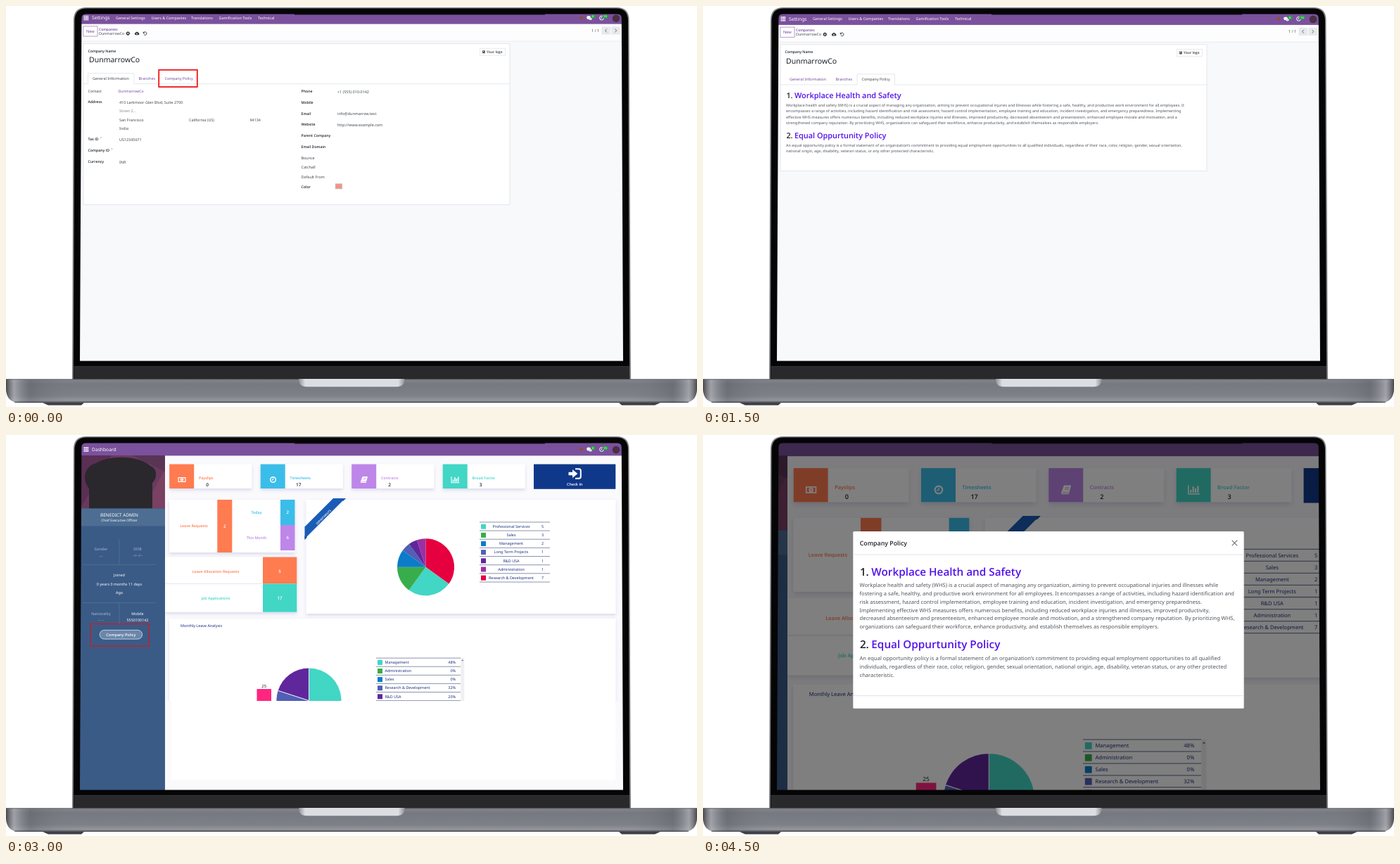
Animation, 982 px wide and 570 px high, one loop 6 s. Source, as an HTML page:

```html
<!DOCTYPE html>
<html lang="en">
<head>
<meta charset="utf-8">
<title>Company policy</title>
<style>
html, body { margin: 0; width: 100%; height: 100%; overflow: hidden; background: #fff; }
svg { display: block; width: 982px; height: 570px; }
text { font-family: "Noto Sans", "Open Sans", sans-serif; text-rendering: geometricPrecision; white-space: pre; }
text.b { font-family: "Open Sans", "Noto Sans", sans-serif; font-weight: 600; }
.scene { opacity: 0; }
.scene:first-child { opacity: 1; }
</style>
</head>
<body>
<svg id="stage" viewBox="0 0 982 570" xmlns="http://www.w3.org/2000/svg"></svg>
<script>
const LOOP = 6000;
const INK = '#41474e', DARK = '#1f242b', PURPLE = '#74489a', NAVY = '#1c2f7c', LINE = '#dee2e6';
const ORANGE = '#ff7b50', SKY = '#3bbde9', LILAC = '#be86e9', TEAL = '#42d6c5';
const GREEN = '#38ad4b', BLUE = '#0a7cca', INDIGO = '#5060b5', VIOLET = '#60279c', MAGENTA = '#9c2fa0', RED = '#e6003f';
const COMPANY = 'DunmarrowCo';

// Drawing helpers; text is placed by the middle of its capitals.
const esc = s => String(s).replace(/&/g, '&amp;');
const text = (x, y, s, { size = 5.42, fill = INK, bold = 0, anchor = 'start', more = '' } = {}) =>
  `<text x="${x}" y="${(y + size * 0.36).toFixed(2)}" font-size="${size}" fill="${fill}" text-anchor="${anchor}"${bold ? ' class="b"' : ''} ${more}>${esc(s)}</text>`;
const mid = (x, y, s, o = {}) => text(x, y, s, { ...o, anchor: 'middle' });
const rect = (x, y, w, h, fill, more = '') => `<rect x="${x}" y="${y}" width="${w}" height="${h}" fill="${fill}" ${more}/>`;
const path = (d, fill, more = '') => `<path d="${d}" fill="${fill}" ${more}/>`;
const stroke = (d, color, w = 1) => path(d, 'none', `stroke="${color}" stroke-width="${w}"`);
const circle = (x, y, r, fill, more = '') => `<circle cx="${x}" cy="${y}" r="${r}" fill="${fill}" ${more}/>`;
const group = (inner, attrs) => `<g ${attrs}>${inner}</g>`;

function pie(cx, cy, r, slices, edge) {
  const total = slices.reduce((sum, s) => sum + s[0], 0);
  let turn = 0;
  const at = () => {
    const a = turn / total * 2 * Math.PI;
    return `${(cx + r * Math.sin(a)).toFixed(2)} ${(cy - r * Math.cos(a)).toFixed(2)}`;
  };
  return slices.map(([n, color]) => {
    const from = at();
    turn += n;
    return path(`M${cx} ${cy}L${from}A${r} ${r} 0 ${n * 2 > total ? 1 : 0} 1 ${at()}Z`, color, edge);
  }).join('');
}

function topBar(y, bottom, title, menu) {
  let out = rect(100, 5, 785, bottom - 5, '#7b519d');
  for (let i = 0; i < 9; i++)
    out += rect(110.6 + (i % 3) * 2.4, y - 3.3 + Math.floor(i / 3) * 2.4, 1.8, 1.8, '#fff');
  out += text(122, y, title, { size: 6.7, fill: '#fff' });
  for (const [x, s] of menu) out += text(x, y, s, { fill: '#fff' });
  out += circle(817.5, y, 2.3, '#8f5326');
  out += `<ellipse cx="828" cy="${y - 0.6}" rx="2.8" ry="2.3" fill="#fff"/><ellipse cx="830.5" cy="${y + 1.2}" rx="2.4" ry="1.9" fill="#e8e0ee"/>`;
  out += circle(846.5, y, 2.9, 'none', 'stroke="#fff" stroke-width="1"') + stroke(`M846.5 ${y - 1.7}V${y + .3}H845.2`, '#fff', .7);
  for (const [x, w, n] of [[831, 6.4, '6'], [847.5, 8, '16']])
    out += rect(x, y - 4.8, w, 5.6, '#28a745', 'rx="2.8"') + mid(x + w / 2, y - 2, n, { size: 4, fill: '#fff' });
  return out + circle(867, y + .6, 5.3, '#4a2f45');
}

const MENU = [[156, 'General Settings'], [206.5, 'Users & Companies'], [263, 'Translations'], [302.5, 'Gamification Tools'], [358, 'Technical']];

function formPage(bottom, active, body) {
  let out = rect(100, 0, 785, 510, '#f8f9fb') + rect(100, 25, 785, 25, '#fdfdfe') + stroke('M100 50H885', '#e4e7eb', .8);
  out += topBar(17, 25.6, 'Settings', MENU);
  out += rect(109.8, 28.8, 20.2, 14.2, '#fff', 'stroke="#a486bd" stroke-width=".8"') + mid(119.9, 36, 'New', { size: 5.7, fill: PURPLE });
  out += text(132, 33, 'Companies', { size: 4.95, fill: PURPLE, bold: 1 }) + text(132, 39.3, COMPANY, { size: 5.25 });
  out += circle(173.3, 39.1, 1.7, 'none', 'stroke="#333" stroke-width="1.4"') + circle(173.3, 39.1, 2.5, 'none', 'stroke="#333" stroke-width=".8" stroke-dasharray="1 .96"');
  out += path('M184 41.2a1.7 1.7 0 0 1 0-3.2a2.3 2.3 0 0 1 4.2 .1a1.6 1.6 0 0 1 .1 3.1z', '#343a40') + path('M186 38.2l1.2 1.4h-.8v1h-.8v-1h-.8z', '#fff');
  out += stroke('M195.9 37.4A2.3 2.3 0 1 1 195.8 40.5', '#343a40', .9) + path('M194.8 36.3v2.6h2.6z', '#343a40');
  out += text(832, 35, '1 / 1', { size: 5.5 });
  for (const [x, d] of [[846.5, 1], [860.2, -1]])
    out += rect(x, 29.4, 12.6, 11.2, '#e7e9ed') + stroke(`M${x + 6.3 + d} 32.6l${-2.2 * d} 2.4l${2.2 * d} 2.4`, '#4a5058', .8);
  out += rect(110, 53.5, 606, bottom - 53.5, '#fff', `stroke="${LINE}" stroke-width=".8"`);
  out += text(116.5, 64.3, 'Company Name', { size: 5.15, fill: DARK, bold: 1 }) + text(118, 76.5, COMPANY, { size: 10.5, fill: DARK });
  out += rect(673.3, 60.2, 36.2, 10, '#fff', `stroke="${LINE}" stroke-width=".7"`) + rect(677, 63.2, 3.8, 4, '#555b62') + rect(678, 64, 1, 1, '#fff')
    + text(683, 65.3, 'Your logo', { size: 5, fill: '#444', bold: 1 });
  out += stroke('M110 110.6H716', LINE, .8);
  const tabs = [[123, 'General Information', 116.5, 65.5], [188.5, 'Branches', 182, 37], [225.5, 'Company Policy', 219, 53.5]];
  tabs.forEach(([x, s, left, w], i) => {
    if (i === active) out += rect(left, 95.6, w, 15.6, '#fff') + stroke(`M${left} 110.6V95.6h${w}V110.6`, LINE, .8);
    out += text(x, 102.6, s, { fill: i === active ? INK : PURPLE });
  });
  return out + body;
}

function fields() {
  const labels = [[116.5, 136, 'Address'], [116.5, 189.3, 'Tax ID'], [116.5, 205, 'Company ID'], [116.5, 221, 'Currency'],
    [419.5, 121.3, 'Phone'], [419.5, 137, 'Mobile'], [419.5, 152.7, 'Email'], [419.5, 168.5, 'Website'],
    [419.5, 184.2, 'Parent Company'], [419.5, 199.8, 'Email Domain'], [419.5, 256.8, 'Color']];
  const values = [[116.5, 121.2, 'Contact'], [161, 137, '410 Larkmoor Glen Blvd, Suite 2700'],
    [161, 162, 'San Francisco'], [260, 162, 'California (US)'], [346.5, 162, '94134'], [161, 174.5, 'India'],
    [161, 190, 'US12345671'], [161, 222, 'INR'], [471, 122, '+1 (555) 010-0142'], [471, 153.5, 'info@dunmarrow.test'],
    [471, 169.2, 'http://www.example.com'], [419.5, 215.7, 'Bounce'], [419.5, 229.4, 'Catchall'], [419.5, 243, 'Default From']];
  return labels.map(([x, y, s]) => text(x, y, s, { size: 5.2, fill: DARK, bold: 1 })).join('')
    + values.map(([x, y, s]) => text(x, y, s)).join('')
    + text(159.5, 121.6, COMPANY, { fill: PURPLE, size: 5.25 })
    + text(161, 149.4, 'Street 2...', { fill: '#85898e' })
    + text(134, 187.3, '?', { size: 4.2, fill: '#1a7fb8' }) + text(149.5, 203, '?', { size: 4.2, fill: '#1a7fb8' })
    + rect(468.3, 252.9, 9, 6.8, '#f9907f', 'stroke="#b9b9bd" stroke-width="1"')
    + rect(217.2, 90.8, 54.6, 24.2, 'none', 'stroke="#f01616" stroke-width="1.8"');
}

// Policy text: k scales the type, y lists hold line centres.
function policy(x, k, parts) {
  return parts.map(({ n, title, y, top, step, lines }) =>
    text(x + .4, y, n + '.', { size: 10.9 * k, fill: DARK, bold: 1 })
    + text(x + 12 * k, y, title, { size: 10.9 * k, fill: '#5212ea', bold: 1 })
    + lines.map((s, i) => text(x, top + i * step, s, { size: 5.42 * k, fill: '#50565d' })).join('')).join('');
}
const WHS = 'Workplace Health and Safety', EQUAL = 'Equal Oppurtunity Policy';
const widePolicy = policy(118, 1, [
  { n: 1, title: WHS, y: 125.8, top: 139.4, step: 8.5, lines: [
    'Workplace health and safety (WHS) is a crucial aspect of managing any organization, aiming to prevent occupational injuries and illnesses while fostering a safe, healthy, and productive work environment for all employees. It',
    'encompasses a range of activities, including hazard identification and risk assessment, hazard control implementation, employee training and education, incident investigation, and emergency preparedness. Implementing',
    'effective WHS measures offers numerous benefits, including reduced workplace injuries and illnesses, improved productivity, decreased absenteeism and presenteeism, enhanced employee morale and motivation, and a',
    'strengthened company reputation. By prioritizing WHS, organizations can safeguard their workforce, enhance productivity, and establish themselves as responsible employers.'] },
  { n: 2, title: EQUAL, y: 182.7, top: 196.7, step: 8.5, lines: [
    'An equal opportunity policy is a formal statement of an organization\u2019s commitment to providing equal employment opportunities to all qualified individuals, regardless of their race, color, religion, gender, sexual orientation,',
    'national origin, age, disability, veteran status, or any other protected characteristic.'] }]);
const modalPolicy = policy(222.5, 1.403, [
  { n: 1, title: WHS, y: 194, top: 213, step: 11.92, lines: [
    'Workplace health and safety (WHS) is a crucial aspect of managing any organization, aiming to prevent occupational injuries and illnesses while',
    'fostering a safe, healthy, and productive work environment for all employees. It encompasses a range of activities, including hazard identification and',
    'risk assessment, hazard control implementation, employee training and education, incident investigation, and emergency preparedness.',
    'Implementing effective WHS measures offers numerous benefits, including reduced workplace injuries and illnesses, improved productivity,',
    'decreased absenteeism and presenteeism, enhanced employee morale and motivation, and a strengthened company reputation. By prioritizing WHS,',
    'organizations can safeguard their workforce, enhance productivity, and establish themselves as responsible employers.'] },
  { n: 2, title: EQUAL, y: 297.6, top: 317.3, step: 11.92, lines: [
    'An equal opportunity policy is a formal statement of an organization\u2019s commitment to providing equal employment opportunities to all qualified',
    'individuals, regardless of their race, color, religion, gender, sexual orientation, national origin, age, disability, veteran status, or any other protected',
    'characteristic.'] }]);

function sidebar() {
  const pale = '#a9b8cc', rule = '#54729a';
  let out = rect(90, 29, 136, 480, '#3b5b87');
  out += rect(90, 29, 136, 75.5, '#693a5e') + path('M90 29H150L106 104H90Z', '#5a2f54') + path('M226 48V104H196Z', '#7a4163') + path('M180 29H226V52Z', '#593455');
  out += path('M118 104.5V76C107 62 112 44 128 40C147 28 190 29 205 44C216 48 215 62 208 68V104.5Z', '#2a282c');
  out += rect(90, 104.5, 136, 25, '#4d6d92');
  out += mid(161, 113.8, 'BENEDICT ADMIN', { size: 6.4, fill: '#fff' }) + mid(161, 121.7, 'Chief Executive Officer', { size: 4.9, fill: '#fff' });
  out += stroke('M109 184.3H213M109 238.5H213M161 148V184M161 239V268', rule, .8);
  for (const [x, y, s, c] of [[135, 162, 'Gender', pale], [135, 172, '---', pale], [187, 162, 'DOB', pale], [187, 171, '--/--/--', pale],
    [161, 199.3, 'Joined', '#fff'], [161, 211.6, '0 years 0 months 11 days', '#fff'], [161, 224, 'Ago', '#fff'],
    [135, 254.3, 'Nationality', pale], [135, 263.2, '- - -', pale], [187, 254.3, 'Mobile', '#fff'], [187, 263.2, '5550100142', '#fff']])
    out += mid(x, y, s, { fill: c });
  out += rect(133.2, 277.3, 60.4, 12.8, '#6a86aa', 'rx="6.4" stroke="#dfe6ef" stroke-width=".8"') + mid(163.4, 283.6, 'Company Policy', { size: 5.5, fill: '#fff', bold: 1 });
  return out + rect(120, 268.5, 83.4, 31.5, 'none', 'stroke="#d8151c" stroke-width="1.2"');
}

const ICONS = [
  rect(-5.5, -3.5, 11, 7, '#fff') + rect(-4.3, -2.3, 8.6, 4.6, ORANGE) + circle(0, 0, 2.3, '#fff') + rect(-.4, -1.3, .8, 2.6, ORANGE),
  circle(0, 0, 3.8, 'none', 'stroke="#fff" stroke-width="1.5"') + stroke('M0 -2.2V.5H-2', '#fff', 1),
  path('M-2.3-4.5H5L2.6 4.5H-4.7Q-5.6 3.4-4.8 2Z', '#fff') + stroke('M-1-2.2H3M-1.5-.6H2.5M-4.2 3H2.4', LILAC, .6),
  stroke('M-5.5-4.5V4.2H6', '#fff', 1.1) + stroke('M-3 3V0M-.6 3V-3.4M1.8 3V-1.6M4.2 3V-4', '#fff', 1.5)
];

function dashboard() {
  const panel = (x, y, w, h) => rect(x, y, w, h, '#fff', 'filter="url(#soft)"');
  const white = { fill: '#fff', bold: 1 };
  let out = rect(70, 0, 850, 510, '#fafafd') + rect(235, 378, 631, 112, '#fff');
  out += topBar(20.5, 29.4, 'Dashboard', []) + sidebar();

  [['Payslips', 0, ORANGE], ['Timesheets', 17, SKY], ['Contracts', 2, LILAC], ['Broad Factor', 3, TEAL]].forEach(([s, n, c], i) => {
    const x = 232.2 + i * 129.5;
    out += panel(x, 41.5, 117, 34.5) + rect(x, 41.5, 35, 34.5, c) + group(ICONS[i], `transform="translate(${x + 17.8} 63.5)"`);
    out += text(x + 41.8, 60.7, s, { size: 5.3, fill: c, bold: 1 }) + mid(x + 54, 70.5, n, { size: 6.5, fill: DARK, bold: 1 });
  });
  out += rect(750, 41.5, 116.3, 35.3, '#10388a') + stroke('M809 48.3H814.2Q816.8 48.3 816.8 51V59Q816.8 61.8 814.2 61.8H809', '#fff', 2)
    + path('M799.5 52.8H805V49L812.4 55L805 61V57.2H799.5Z', '#fff') + mid(808.3, 70.2, 'Check In', { ...white, size: 5.5 });

  out += panel(232, 92, 178.5, 75) + rect(300.3, 92, 21, 75, ORANGE) + rect(390, 92, 20.5, 36, SKY) + rect(390, 128, 20.5, 36, LILAC);
  out += panel(226, 173.5, 187.3, 37.8) + panel(226, 211.5, 187.3, 40.2) + stroke('M226 211.4H365', '#e7e8f3', 1);
  out += rect(365, 173.5, 48.3, 38, ORANGE) + rect(365, 211.5, 48.3, 40.2, TEAL);
  for (const [x, y, s, c] of [[267, 129.3, 'Leave Requests', ORANGE], [356, 110, 'Today', SKY], [356, 146, 'This Month', LILAC],
    [298, 193.6, 'Leave Allocation Requests', ORANGE], [298, 231.8, 'Job Applications', TEAL]])
    out += mid(x, y, s, { size: 5.3, fill: c, bold: 1 });
  for (const [x, y, n] of [[310.8, 129.3, 2], [400.2, 110, 2], [400.2, 146, 6], [389, 193.4, 5], [389, 232, 17]])
    out += mid(x, y, n, { ...white, size: 6.2 });

  out += panel(426.5, 92, 440, 162);
  out += path('M424.5 143V149L428 145ZM477 90H483L479 94Z', '#0c3a80') + path('M465 90H482L424.5 147.5V130.5Z', '#1a5cb5')
    + mid(0, 0, 'DEPARTMENTS', { ...white, size: 4, more: 'transform="translate(451.2 116.8) rotate(-45)"' });
  const staff = [['Professional Services', 5, TEAL], ['Sales', 3, GREEN], ['Management', 2, BLUE], ['Long Term Projects', 1, INDIGO],
    ['R&D USA', 1, VIOLET], ['Administration', 1, MAGENTA], ['Research & Development', 7, RED]];
  out += pie(596.5, 187.8, 40.5, [staff[6], ...staff.slice(0, 6)].map(([, n, c]) => [n, c]), '');
  staff.forEach(([s, n, c], i) => {
    const y = 130 + i * 12.15;
    out += stroke(`M673 ${y - 6.1}H773`, '#8088a3', .9) + rect(675, y - 3.3, 7, 7, c) + mid(718, y, s, { fill: NAVY }) + mid(762.5, y, n, { fill: NAVY });
  });
  out += stroke('M673 209H773', '#8088a3', .9);

  let leave = panel(232, 261, 634.5, 140) + text(248, 271, 'Monthly Leave Analysis', { fill: NAVY });
  leave += mid(366.7, 357, '25', { size: 5.9, fill: DARK }) + rect(356.5, 361, 20.5, 40, '#ff2680');
  leave += pie(430.5, 377.5, 46.5, [[48, TEAL], [32, INDIGO], [20, VIOLET]], 'stroke="#fff" stroke-width=".8"');
  [['Management', 48, TEAL], ['Administration', 0, GREEN], ['Sales', 0, BLUE], ['Research & Development', 32, INDIGO], ['R&D USA', 20, VIOLET]].forEach(([s, n, c], i) => {
    const y = 323.2 + i * 12.1;
    leave += stroke(`M526 ${y - 6.1}H646`, '#8088a3', .9) + rect(528, y - 3.3, 7, 7, c)
      + text(538.5, y, s, { fill: NAVY }) + text(639, y, n + '%', { fill: NAVY, anchor: 'end' });
  });
  leave += stroke('M526 377.6H646', '#8088a3', .9) + rect(646.3, 317, 5, 61, '#f0f0f2') + path('M647.3 321l1.5-1.8l1.5 1.8z', '#666');
  return out + group(leave, 'clip-path="url(#upper)"');
}

function modal() {
  return group(dashboard(), 'transform="matrix(1.4 0 0 1.4 -196.4 -11)"')
    + rect(90, 0, 800, 520, '#000', 'opacity=".5"')
    + rect(213.3, 137, 555.4, 251.7, '#fff', 'rx="1.5"')
    + text(222.7, 153.5, 'Company Policy', { size: 8.8, fill: DARK, bold: 1 })
    + stroke('M751.7 149.7l7.6 7.6m0-7.6l-7.6 7.6', '#6b6f74', 1.1)
    + stroke('M213.3 170H768.7M213.3 370.6H768.7', LINE, .9) + modalPolicy;
}

function laptop(screen) {
  return path('M94 531L96 20Q96 2 114 2H868Q885.5 2 885.5 20L888 531Z', '#7d7f83')
    + path('M95.8 531L97.6 21Q97.6 3.6 114.5 3.6H867.5Q884 3.6 884 21L886.2 531Z', '#050506')
    + rect(96.5, 512, 789.5, 19, '#29292b') + stroke('M96.5 512.3H886', '#3a3a3d', .8)
    + group(screen, 'clip-path="url(#glass)"')
    + rect(410, 10.5, 356, 1.9, '#0b0910')
    + path('M50 563H112L107 567.5H60ZM870 563H932L922 567.5H875Z', '#3d3f44')
    + path('M0 530.5H982V545Q981 564 962 564H20Q1 564 0 545Z', 'url(#metal)')
    + path('M0 530.5H982V545Q981 564 962 564H20Q1 564 0 545Z', 'url(#ends)')
    + stroke('M0 530.8H982', '#55575d', .8) + stroke('M12 563.2H970', '#4c4e54', 1)
    + path('M416 530H566.5Q566.5 541.3 555 541.3H427.5Q416 541.3 416 530Z', 'url(#lip)');
}

const stop = (o, c, a = 1) => `<stop offset="${o}" stop-color="${c}" stop-opacity="${a}"/>`;
const defs = `<defs>
<clipPath id="glass"><path d="M113 11.5H869Q874.8 11.5 874.8 17.5L877 504.5H105L107.4 17.5Q107.4 11.5 113 11.5Z"/></clipPath>
<clipPath id="upper"><rect x="200" y="250" width="700" height="128"/></clipPath>
<filter id="soft" x="-20%" y="-20%" width="140%" height="150%"><feDropShadow dx="0" dy="2.5" stdDeviation="2.2" flood-color="#5a5aa0" flood-opacity=".2"/></filter>
<linearGradient id="metal" x2="0" y2="1">${stop(0, '#85878e')}${stop(.2, '#777980')}${stop(.7, '#7e8087')}${stop(.9, '#94969c')}${stop(1, '#5c5e64')}</linearGradient>
<linearGradient id="ends">${stop(0, '#33353a', .75)}${stop(.012, '#c4c6cc', .5)}${stop(.035, '#50525a', .3)}${stop(.1, '#808289', 0)}${stop(.9, '#808289', 0)}${stop(.965, '#50525a', .3)}${stop(.988, '#c4c6cc', .5)}${stop(1, '#33353a', .75)}</linearGradient>
<linearGradient id="lip">${stop(0, '#8f9197')}${stop(.06, '#dcdde3')}${stop(.94, '#dcdde3')}${stop(1, '#8f9197')}</linearGradient>
</defs>`;

const scenes = [
  formPage(282.6, 0, fields()),
  group(formPage(233.2, 2, widePolicy), 'transform="translate(0 1.3)"'),
  dashboard(),
  modal()
];
document.getElementById('stage').innerHTML = defs + laptop(group(scenes.map(s => group(s, 'class="scene"')).join(''), ''));

// Each scene holds one equal share of the loop, with hard cuts.
document.querySelectorAll('.scene').forEach((el, i, all) => {
  const n = all.length;
  const steps = [[0, 0], [i / n, 1], [(i + 1) / n, 0], [1, 0]];
  if (i === 0) steps.shift();
  if (i === n - 1) steps.splice(2, 2, [1, 1]);
  el.animate(steps.map(([offset, opacity]) => ({ offset, opacity, easing: 'step-end' })), { duration: LOOP, iterations: Infinity });
});
</script>
</body>
</html>
```
